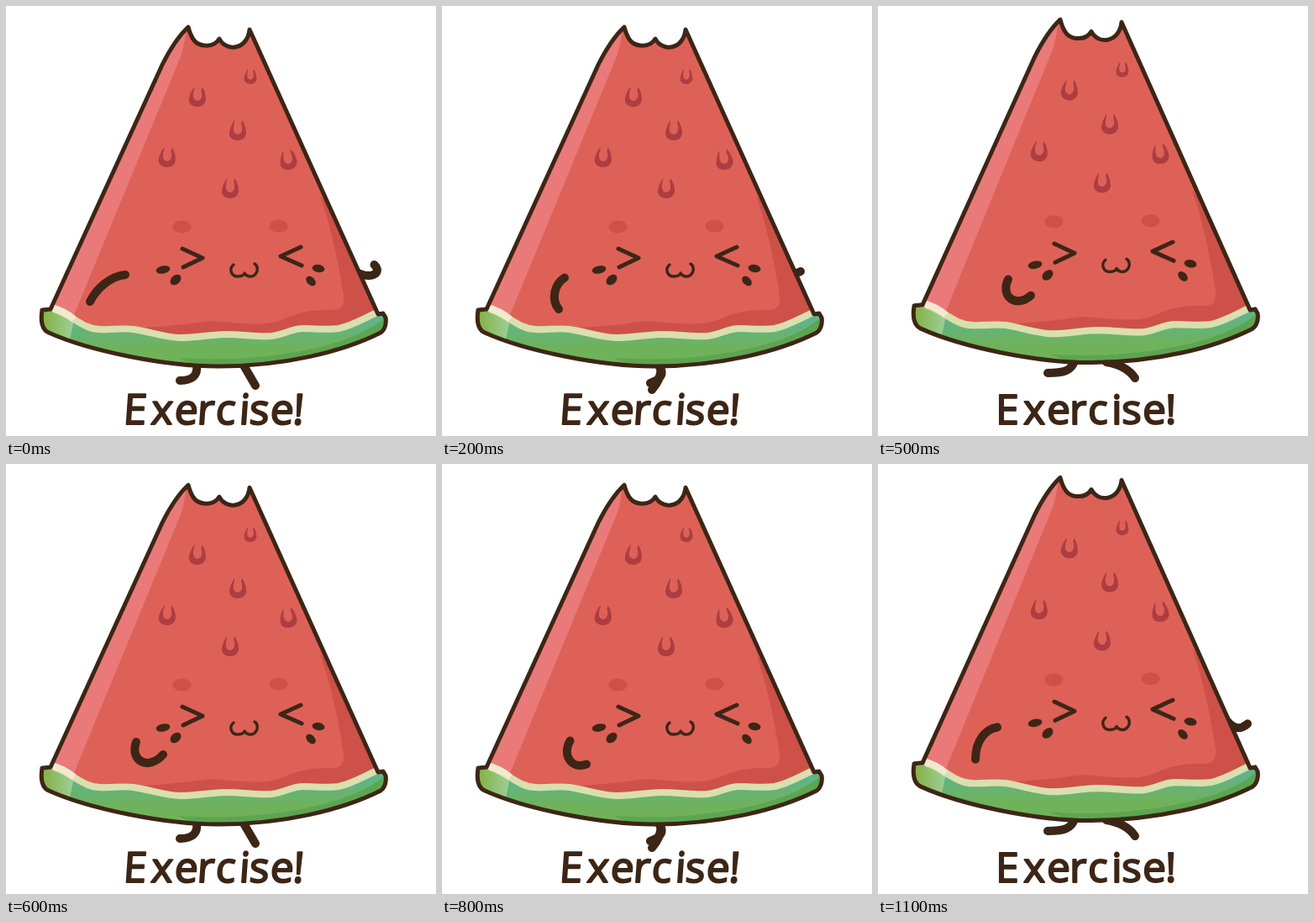
Recreate the animation shown at these times as an HTML page. Size 512 by 512 pixels, loop 1.2 s.

```html
<!DOCTYPE html>
<html lang="en">
<head>
<meta charset="utf-8">
<title>Exercise!</title>
<style>
  html, body { margin: 0; width: 100%; height: 100%; overflow: hidden; background: #fff; }
  svg { display: block; width: 100vw; height: 100vh; }
  .line { fill: none; stroke: #3d2616; stroke-linecap: round; stroke-linejoin: round; }
  .limb { stroke-width: 10; }
  .dark { fill: #3d2616; }
  .shade { fill: #cd5149; }
  text { font: 50px "Open Sans", "Noto Sans", sans-serif; fill: #3d2616;
         stroke: #3d2616; stroke-width: 2; stroke-linejoin: round; }
</style>
</head>
<body>
<svg viewBox="0 0 512 512">
  <defs>
    <linearGradient id="rind" gradientUnits="userSpaceOnUse" x1="0" y1="375" x2="0" y2="420">
      <stop offset="0" stop-color="#5fb48a"/><stop offset=".75" stop-color="#70b259"/>
    </linearGradient>
    <linearGradient id="rindLight" gradientUnits="userSpaceOnUse" x1="44" y1="0" x2="80" y2="0">
      <stop offset="0" stop-color="#85b146"/><stop offset="1" stop-color="#9bcf97"/>
    </linearGradient>
    <path id="outline" d="M217 25C203 38 194 54 186 70L53 361L43 362C41 375 42 385 51 389C100 411 190 429 252 429C330 429 400 412 446 389C452 385 453 376 452 371L449 366L443 367L290 28C289 38 283 48 272 49C264 50 257 45 254 39C251 44 246 48 236 47C226 46 221 40 217 25Z"/>
    <path id="wave" d="M40 357C75 361 88 385 112 385C125 386 138 383 152 385C172 388 190 395 208 395C228 395 242 391 262 391C282 391 300 394 316 393C332 391 340 384 354 384C368 384 382 386 396 384C415 380 428 370 460 357"/>
    <path id="seed" fill="#ad3d41" d="M-4-12C-8-6-10 0-10 4C-10 10-4 12 0 12C6 12 10 8 10 3C10-2 8-8 5-12L4-8C6-3 6 4 0 5C-6 4-6-2-4-9Z"/>
    <clipPath id="inside"><use href="#outline"/></clipPath>
  </defs>

  <path id="backLeg" class="line limb"/>
  <path id="frontLeg" class="line limb"/>

  <g id="body">
    <path id="farArm" class="line limb"/>
    <g clip-path="url(#inside)">
      <use href="#outline" fill="#de6158"/>
      <path fill="#e97a79" d="M217 20C213 35 212 50 208 60L76 380L30 380L150 60Z"/>
      <path class="shade" d="M374 226C386 260 396 305 402 345C403 358 398 363 385 362C365 362 350 364 330 373C310 382 280 378 245 375C225 377 205 381 160 383V400H470V330Z"/>
      <path fill="url(#rind)" d="M40 357C75 361 88 385 112 385C125 386 138 383 152 385C172 388 190 395 208 395C228 395 242 391 262 391C282 391 300 394 316 393C332 391 340 384 354 384C368 384 382 386 396 384C415 380 428 370 460 357V440H40Z"/>
      <path fill="#5da551" d="M452 370C425 396 365 412 300 418C270 421 235 421 205 419L252 440L470 400Z"/>
      <path fill="url(#rindLight)" d="M36 355L82 368L75 402L36 400Z"/>
      <use href="#wave" fill="none" stroke="#d9dfae" stroke-width="8"/>
      <path fill="none" stroke="#f0ead0" stroke-width="8" d="M54 359C66 362 74 367 81 373"/>
      <path fill="url(#rindLight)" d="M36 355L53 361L58 367L50 385L36 390Z"/>
    </g>
    <use href="#outline" class="line" stroke-width="5"/>
    <g id="seeds"></g>

    <ellipse class="shade" cx="209.5" cy="263" rx="11" ry="7.5"/>
    <ellipse class="shade" cx="324.5" cy="262" rx="11" ry="7.5"/>
    <path class="line" stroke-width="5" d="M210 289L234 300L211 311M351 287L327 298L352 309"/>
    <path class="line" stroke-width="3.4" d="M271 308C265 313 268 322 276 322C281 322 284 320 284 318C286 322 291 323 295 321C301 317 300 309 296 307"/>
    <ellipse class="dark" rx="8.5" ry="4.6" transform="translate(187 314) rotate(-12)"/>
    <ellipse class="dark" rx="7.3" ry="5.3" transform="translate(202 326) rotate(-42)"/>
    <ellipse class="dark" rx="7.5" ry="4.6" transform="translate(372 312.5) rotate(10)"/>
    <ellipse class="dark" rx="6.8" ry="4.6" transform="translate(363 327.5) rotate(45)"/>
    <path id="nearArm" class="line limb"/>
  </g>

  <text id="label" x="140 173 201 228 250 278 290 315 342" y="498">Exercise!</text>
</svg>
<script>
const STEP_MS = 100, STEPS = 12, STRIDE = 6;
const el = id => document.getElementById(id);

// x, y, scale, tilt
const seeds = [
  [228, 108, 1, 3], [291, 84, .74, 0], [276, 148, 1, 0],
  [192, 180, 1, 3], [336, 183, 1, -10], [267, 217, 1, 0]
];
el('seeds').innerHTML = seeds.map(([x, y, k, r]) =>
  `<use href="#seed" transform="translate(${x} ${y}) rotate(${r}) scale(${k})"/>`).join('');

// Vertical bounce per step of a stride: positive is squashed, negative stretched.
const bounce = [0, 1, 0, -1.05, -1.4, -1.05];

const backLegs = [
  'M227 426C229 440 222 446 207 446',
  'M246 432C240 442 232 446 218 446',
  'M256 426C266 436 262 444 248 449',
  'M243 425C238 440 230 448 222 454',
  'M240 420C234 436 224 444 209 447',
  'M234 423C230 434 222 437 202 437'
];
const frontLegs = [
  'M283 428L297 452',
  'M274 432C280 436 282 444 277 455',
  'M260 426C262 438 258 448 250 457',
  'M262 425C280 428 284 438 280 449',
  'M268 420C286 424 294 434 297 446',
  'M272 424C290 427 300 434 306 443'
];

// Arm curves, from swung fully back to fully forward.
const mix = (a, b) => a.map((v, i) => (v + b[i]) / 2);
const curve = p => `M${p.slice(0, 2)}C${p.slice(2)}`;
const back = [142, 320, 124, 322, 108, 336, 100, 352];
const bent = [142, 319, 128, 321, 116, 335, 116, 357];
const down = [150, 328, 141, 340, 142, 363, 162, 365];
const curled = [155, 331, 145, 352, 165, 365, 182, 350];
const forward = [155, 331, 147, 353, 169, 366, 187, 346];
const nearArms = [back, bent, mix(bent, down), down, mix(down, curled), curled, forward].map(curve);
const farArms = [
  'M416 316C430 326 450 320 438.5 308',
  'M416 312C426 324 434 320 440 315',
  'M410 312C418 320 422 319 427 316'
];

function draw(ms) {
  const step = Math.floor(ms / STEP_MS) % STEPS;
  const leg = step % STRIDE;
  const swing = Math.min(step, STEPS - step);
  const s = bounce[leg];

  el('body').setAttribute('transform', `matrix(1 0 0 ${1 - .01034 * s} 0 ${8.65 * s})`);
  el('backLeg').setAttribute('d', backLegs[leg]);
  el('frontLeg').setAttribute('d', frontLegs[leg]);
  el('nearArm').setAttribute('d', nearArms[swing]);
  el('farArm').setAttribute('d', farArms[swing] || '');
  // The lettering leans on every other step.
  el('label').setAttribute('transform',
    step % 2 ? '' : 'translate(0 482) skewX(-4) translate(0 -482)');
}

let start;
function tick(now) {
  start ??= now;
  draw(now - start);
  requestAnimationFrame(tick);
}
draw(0);
requestAnimationFrame(tick);
</script>
</body>
</html>
```
